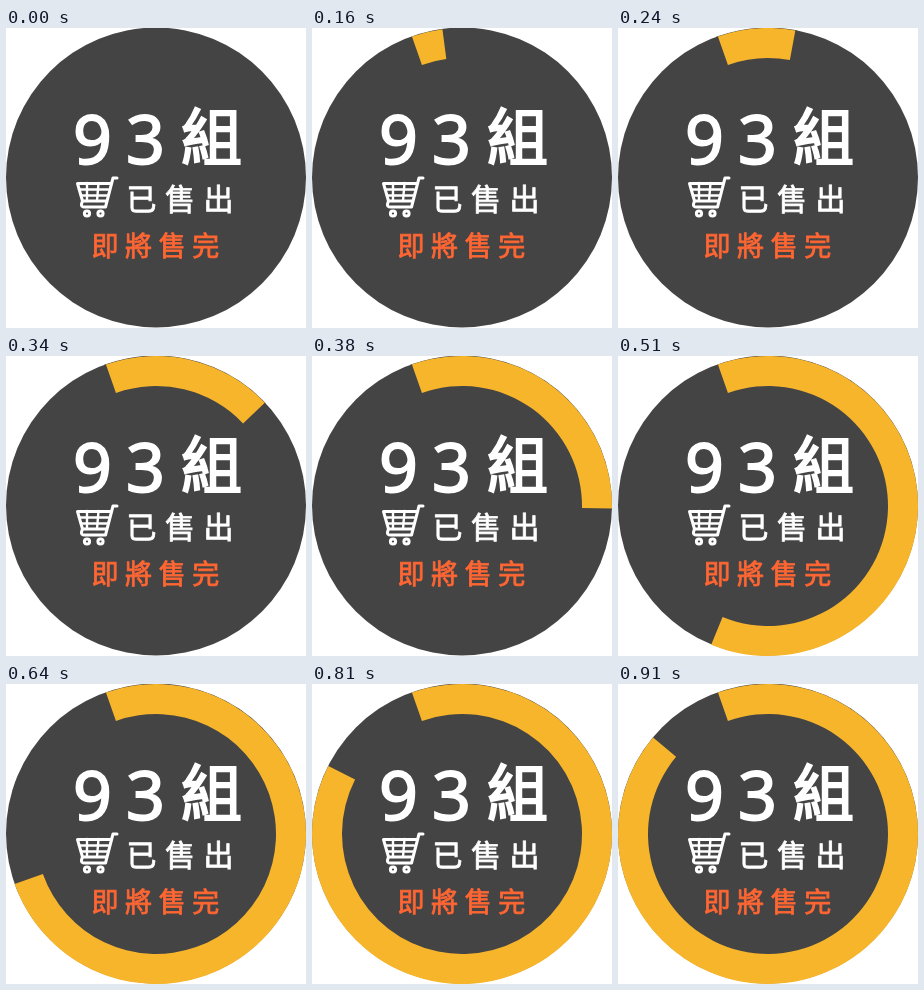
An HTML page that plays this animation: 300x300 px, repeating every 1030 ms.

```html
<!DOCTYPE html>
<html lang="zh-Hant">
<head>
<meta charset="utf-8">
<style>
html, body { margin: 0; width: 100%; height: 100%; overflow: hidden; background: #fff; }
svg { display: block; width: 100%; height: 100%; }
text { font-family: "Noto Sans CJK TC", "Noto Sans CJK", sans-serif; fill: #fff; stroke: #fff; stroke-width: .8; }
.num { font: 68px "Noto Sans", "Open Sans", sans-serif; letter-spacing: 14.1px; stroke-width: 1.8; }
.unit { font-size: 61px; stroke-width: 2.2; }
.sold { font-size: 30px; letter-spacing: 8.5px; }
.soon { font-size: 27px; letter-spacing: 6.6px; fill: #ff6633; stroke: #ff6633; }
.cart { fill: none; stroke: #fff; stroke-width: 3; stroke-linecap: round; stroke-linejoin: round; }
</style>
</head>
<body>
<svg viewBox="0 0 300 300">
  <circle cx="150" cy="149.5" r="150" fill="#444"/>
  <path id="ring" fill="#f7b52c"/>
  <text class="num" x="67" y="135.5">93</text>
  <text class="unit" x="175" y="132.3">組</text>
  <text class="sold" x="120.5" y="182">已售出</text>
  <text class="soon" x="85.5" y="228">即將售完</text>
  <g class="cart">
    <path d="M111 150H107L99.5 179H78.5Q75 179 75.5 176L76.5 173"/>
    <path d="M104 155.5H71.5L76.5 173H100.5"/>
    <path stroke-width="2.4" d="M73 161.5H102M75 167.5H101M81 155V173M92.5 155L91 173"/>
    <circle cx="81" cy="185.5" r="2.6"/>
    <circle cx="94.5" cy="185.5" r="2.6"/>
  </g>
</svg>
<script>
const LOOP = 1030, COUNT = 18, START = -19.5;
// key poses: [step, sweep in degrees]
const keys = [[0, 0], [2, 12], [5, 66], [13, 244], [14, 270], [16, 316.5], [17, 329.5]];
const ring = document.getElementById("ring");

// Steps are short in the middle of the turn and long at both ends.
function hold(i) {
  const ease = 20 * (Math.abs(i - 7.5) - 1.5);
  return Math.min(80, Math.max(20, ease)) + 10 * Math.max(0, i - 14);
}

function stepAt(t) {
  let i = 0;
  while (i < COUNT - 1 && t >= hold(i)) t -= hold(i++);
  return i;
}

function sweepAt(i) {
  const k = Math.max(1, keys.findIndex(key => key[0] >= i));
  const [i0, a0] = keys[k - 1], [i1, a1] = keys[k];
  return a0 + (a1 - a0) * (i - i0) / (i1 - i0);
}

function point(r, deg) {
  const a = deg * Math.PI / 180;
  return `${150 + r * Math.sin(a)} ${150 - r * Math.cos(a)}`;
}

function arc(sweep) {
  if (!sweep) return "";
  const end = START + sweep, big = sweep > 180 ? 1 : 0;
  return `M${point(150, START)}A150 150 0 ${big} 1 ${point(150, end)}` +
    `L${point(120, end)}A120 120 0 ${big} 0 ${point(120, START)}Z`;
}

function draw(now) {
  ring.setAttribute("d", arc(sweepAt(stepAt(now % LOOP))));
  requestAnimationFrame(draw);
}
draw(0);
</script>
</body>
</html>
```
